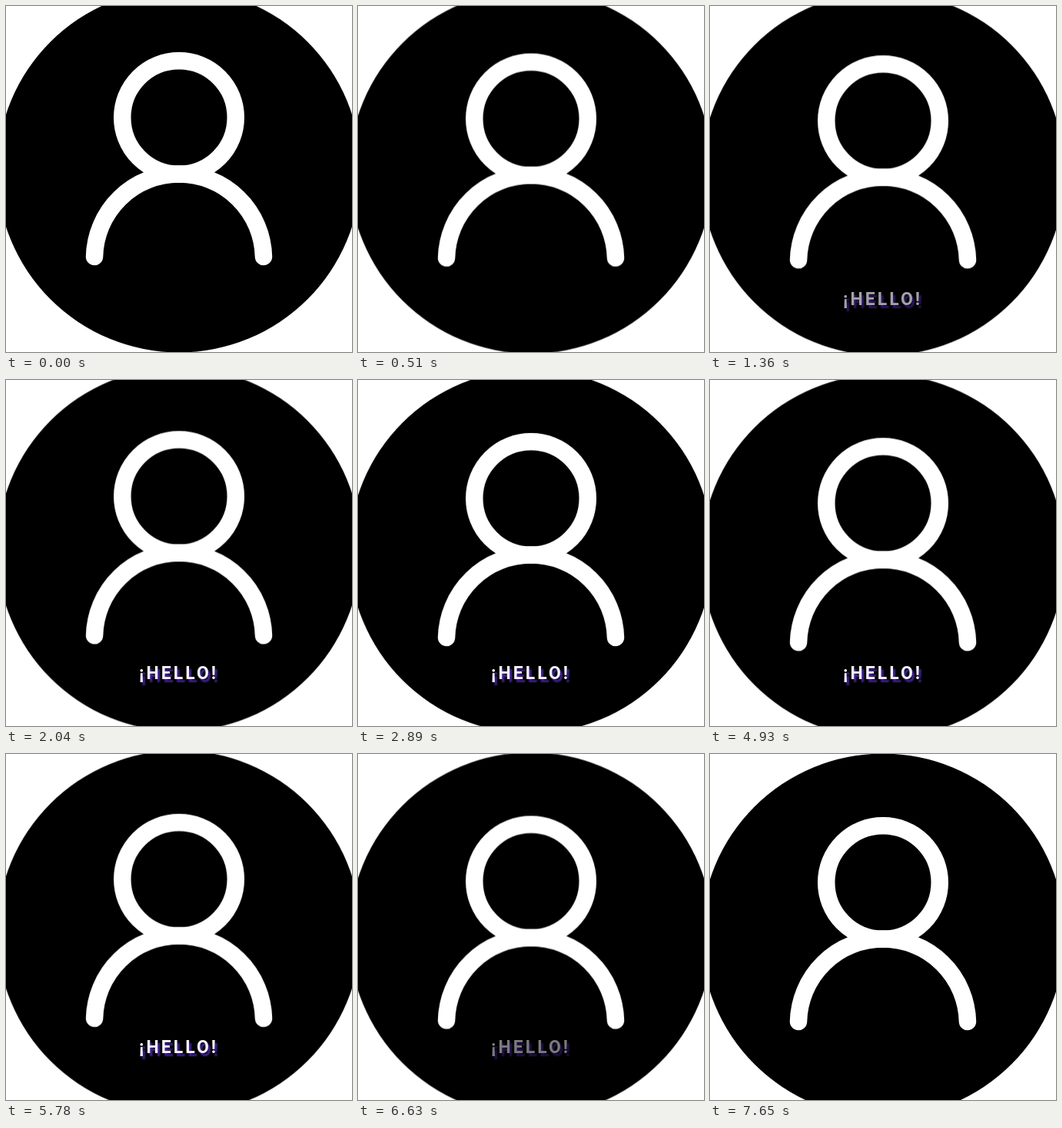
Recreate the animation shown at these times as an HTML page. Size 450 px wide and 450 px high, loop 8.16 s.

```html
<!DOCTYPE html>
<html lang="en">
<head>
<meta charset="utf-8">
<title>Hello</title>
<style>
  html, body { margin: 0; width: 100%; height: 100%; overflow: hidden; background: #fff; }
  svg { display: block; width: 450px; height: 450px; }

  .badge { animation: drift 8160ms infinite; }
  .figure { fill: none; stroke: #fff; stroke-width: 22.5; stroke-linecap: round; }
  .greeting {
    font: 700 23px Roboto, Inter, sans-serif;
    letter-spacing: 3px;
    fill: #f4f4f4;
    text-shadow: 3px 4px 2px #43209c;
    animation: fade 8160ms infinite;
  }

  /* One picture every 170 ms: 42 steps of drift, then a rest */
  @keyframes drift {
    0% { transform: translateY(0); animation-timing-function: steps(42); }
    87.5%, 100% { transform: translateY(22px); }
  }
  @keyframes fade {
    0% { opacity: 0; }
    8.3333% { opacity: 0; animation-timing-function: steps(6); }
    20.8333% { opacity: 1; }
    75% { opacity: 1; animation-timing-function: steps(6); }
    87.5%, 100% { opacity: 0; }
  }
</style>
</head>
<body>
<svg viewBox="0 0 450 450">
  <g class="badge">
    <circle cx="225" cy="214" r="236.6"/>
    <g class="figure">
      <circle cx="225" cy="145" r="73.75"/>
      <path d="M115.03 326A110 110 0 0 1 334.97 326"/>
    </g>
  </g>
  <text class="greeting" x="173" y="389">¡HELLO!</text>
</svg>
</body>
</html>
```
